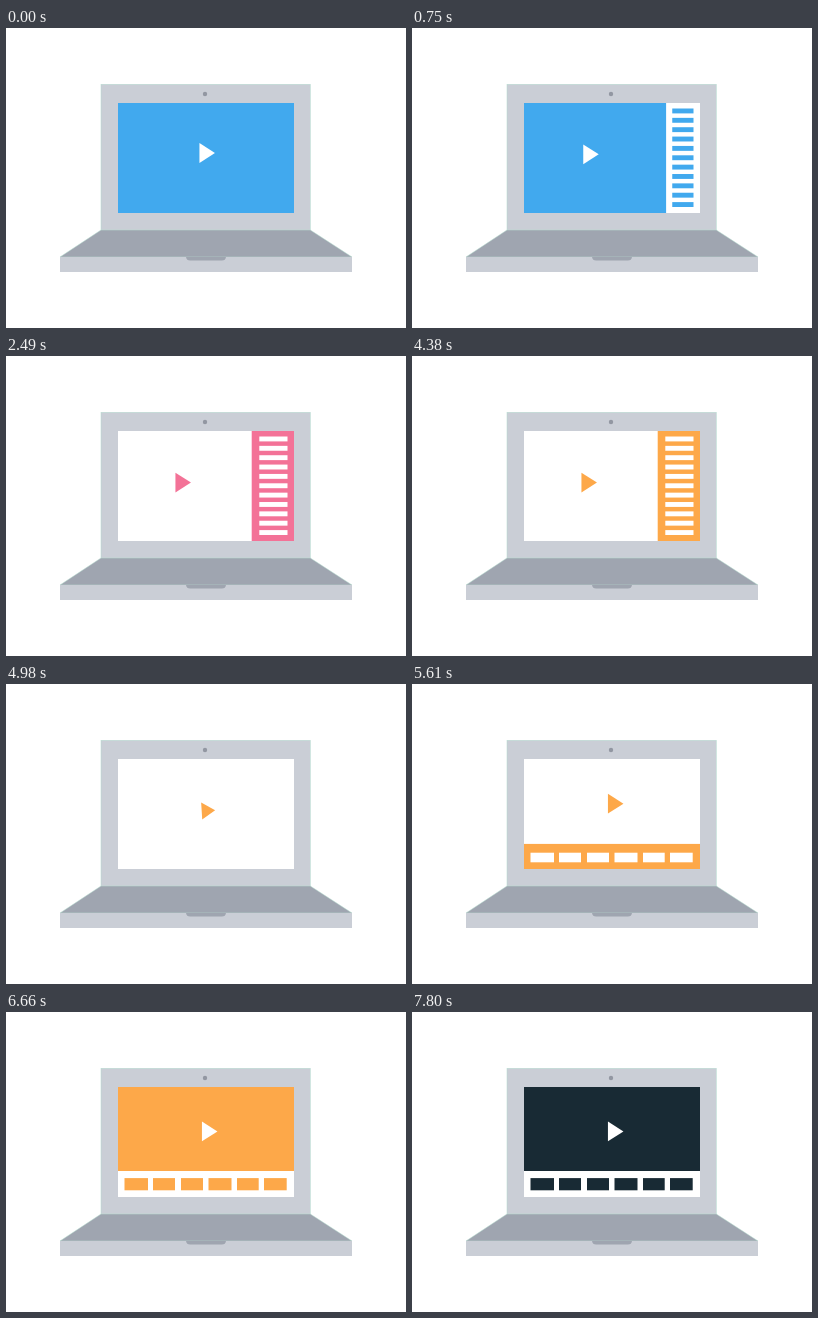
These frames come from a looping animation (400x300 px, 8000 ms). An HTML page:

```html
<!DOCTYPE html>
<html lang="en">
<head>
<meta charset="utf-8">
<title>Laptop video player</title>
<style>
  html, body { margin: 0; width: 100%; height: 100%; overflow: hidden; background: #fff; }
  svg { display: block; width: 100vw; height: 100vh; }
</style>
</head>
<body>
<svg viewBox="0 0 400 300">
  <defs>
    <clipPath id="screenClip"><rect x="112" y="75" width="176" height="110"/></clipPath>
  </defs>
  <g stroke="#b4dccf" stroke-width=".5">
    <rect x="95" y="56.3" width="209.3" height="146" fill="#caced6"/>
    <path d="M95 202H304.300L346 229H54Z" fill="#9fa5b0"/>
  </g>
  <rect x="54" y="229" width="292" height="15" fill="#caced6"/>
  <path d="M180 229H220Q219.500 232.500 216 232.500H184Q180.500 232.500 180 229Z" fill="#9fa5b0"/>
  <circle cx="199" cy="66" r="2.200" fill="#9297a2"/>
  <g clip-path="url(#screenClip)">
    <rect id="screen" x="112" y="75" width="176" height="110"/>
    <rect id="sidebar" y="75" height="110"/>
    <g id="rows"></g>
    <rect id="strip" x="112" width="176"/>
    <g id="thumbs"></g>
    <path id="play" d="M-7.750 -9.900L7.750 0L-7.750 9.900Z"/>
  </g>
</svg>
<script>
const LOOP = 8000;
const BLUE = '#41a9ee', PINK = '#f37297', ORANGE = '#fda849', DARK = '#182a34', WHITE = '#fff';
const THEMES = [[0, BLUE], [2490, PINK], [3090, DARK], [3690, ORANGE], [7230, PINK], [7800, DARK]];
const THUMBS = [[118.5, 23.5], [147, 22], [175, 22], [202.5, 23], [231, 21.7], [258, 22.7]];

const $ = id => document.getElementById(id);
const set = (el, attrs) => { for (const k in attrs) el.setAttribute(k, attrs[k]); };
const addRect = (parent, attrs) => {
  const el = document.createElementNS('http://www.w3.org/2000/svg', 'rect');
  set(el, attrs);
  return parent.appendChild(el);
};

const quad = p => p < .5 ? 2 * p * p : 1 - 2 * (1 - p) ** 2;
const cubic = p => p < .5 ? 4 * p ** 3 : 1 - 4 * (1 - p) ** 3;
const quartOut = p => 1 - (1 - p) ** 4;
const tween = (t, from, to, ease) => ease(Math.min(1, Math.max(0, (t - from) / (to - from))));

const rows = Array.from({ length: 11 }, (_, i) => addRect($('rows'), { y: 80.5 + 9.36 * i, height: 4.9 }));
const thumbs = THUMBS.map(([x, width]) => addRect($('thumbs'), { x, width }));

function draw(t) {
  const color = THEMES.filter(([start]) => t >= start).pop()[1];
  const inverted = t >= 1800 && t < 6630;
  const back = inverted ? WHITE : color;
  const front = inverted ? color : WHITE;
  set($('screen'), { fill: back });
  set($('rows'), { fill: back });
  set($('thumbs'), { fill: back });
  set($('play'), { fill: front });

  const sideWidth = 42.3 * (tween(t, 210, 1000, quad) - tween(t, 4450, 4930, quad));
  set($('sidebar'), { x: 288 - sideWidth, width: sideWidth, fill: front });
  const rowWidth = 28.2 * (tween(t, 500, 1350, quartOut) - tween(t, 4380, 4750, quad));
  rows.forEach(row => set(row, { x: 281.5 - rowWidth, width: rowWidth }));

  const stripHeight = 26 * tween(t, 5190, 5720, cubic);
  set($('strip'), { y: 185 - stripHeight, height: stripHeight, fill: front });
  const thumbHeight = 12.2 * tween(t, 5400, 6060, quartOut);
  thumbs.forEach(thumb => set(thumb, { y: 178.3 - thumbHeight, height: thumbHeight }));

  const x = 201.2 - 24.5 * tween(t, 210, 900, quad) + .5 * tween(t, 900, 1350, quad)
    + 26.5 * tween(t, 4380, 5160, cubic);
  const y = 125 + 1.6 * tween(t, 210, 1000, quad) - 7.2 * tween(t, 5190, 5720, cubic);
  const dip = tween(t, 4380, 4920, quad) - tween(t, 4920, 5160, quad);
  set($('play'), { transform: `translate(${x} ${y}) rotate(${-4 * dip}) scale(${1 - .15 * dip})` });
}

function frame() {
  draw(performance.now() % LOOP);
  requestAnimationFrame(frame);
}
frame();
</script>
</body>
</html>
```
